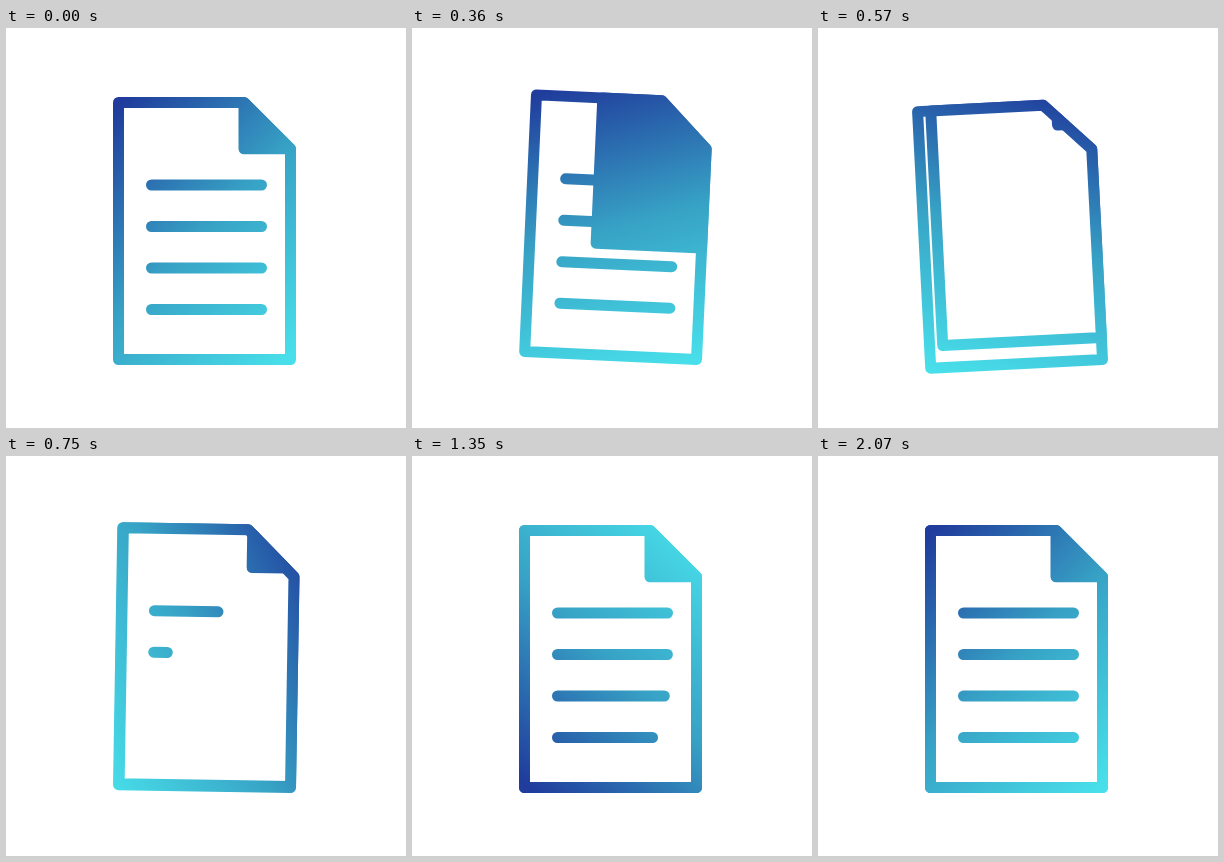
Animation of 400x400 px, one loop 4400 ms. Source, as an HTML page:

```html
<!DOCTYPE html>
<html lang="en">
<head>
<meta charset="utf-8">
<title>Document page turn</title>
<style>
  html, body { margin: 0; width: 100%; height: 100%; overflow: hidden; background: #fff; }
  svg { display: block; width: 100%; height: 100%; }
</style>
</head>
<body>
<svg viewBox="0 0 400 400">
  <defs>
    <linearGradient id="ink" gradientUnits="userSpaceOnUse">
      <stop offset="0" stop-color="#203c9c"/>
      <stop offset=".5" stop-color="#37a2c5"/>
      <stop offset="1" stop-color="#48dfea"/>
    </linearGradient>
  </defs>
  <g id="page" fill="none" stroke="url(#ink)" stroke-width="11" stroke-linecap="round" stroke-linejoin="round">
    <path id="outline"/>
    <path id="oldLines"/>
    <path id="sheet"/>
    <path id="fold" fill="url(#ink)"/>
    <path id="newLines"/>
  </g>
</svg>
<script>
const LOOP = 4400, STEP = 30;
const LEFT = 112.5, TOP = 74.5, RIGHT = 284.5, BOTTOM = 331.5;
const CUT_X = 238, CUT_Y = 120.8;
const LINE_X = 145.5, LINE_LENGTH = 110, LINE_YS = [157, 198.5, 240, 281.5];
const SHEET_START = 238, FLIP = 525, FOLD_START = 537, LINES_START = 575, LINE_DELAY = 145;
const SWING = [[0, 0], [200, 7], [548, -3], [838, 2], [1168, 0]];

const el = id => document.getElementById(id);
const clamp = u => Math.min(1, Math.max(0, u));
const mix = (a, b, u) => a + (b - a) * u;
const easeInOut = u => (1 - Math.cos(Math.PI * clamp(u))) / 2;
const easeOut = (u, power) => 1 - (1 - clamp(u)) ** power;
const polygon = points => "M" + points.map(p => p.join(" ")).join("L") + "Z";
const show = (id, visible) => el(id).setAttribute("visibility", visible ? "visible" : "hidden");

// Page body with its cut corner; (x, y) is the lower left corner.
const sheetPath = (x, y) =>
  polygon([[x, TOP], [CUT_X, TOP], [RIGHT, CUT_Y], [RIGHT, y], [x, y]]);

// Folded corner growing out of a point on the cut.
const foldPath = size => polygon(
  [[CUT_X, TOP], [CUT_X, CUT_Y], [RIGHT, CUT_Y]]
    .map(([x, y]) => [mix(254, x, size), mix(90.5, y, size)]));

const linesPath = progress => LINE_YS.map((y, i) => {
  const p = progress(i);
  return p > 0 ? `M${LINE_X} ${y}h${LINE_LENGTH * p}` : "";
}).join("");

function swingAngle(t) {
  for (let i = 1; i < SWING.length; i++) {
    const [t0, a0] = SWING[i - 1], [t1, a1] = SWING[i];
    if (t < t1) return mix(a0, a1, easeInOut((t - t0) / (t1 - t0)));
  }
  return 0;
}

function turnGradient(t) {
  const angle = Math.PI * (-0.75 + 2 * easeInOut(t / 2040));
  const dx = 150 * Math.cos(angle), dy = 150 * Math.sin(angle);
  const ends = { x1: 198.5 + dx, y1: 203 + dy, x2: 198.5 - dx, y2: 203 - dy };
  for (const name in ends) el("ink").setAttribute(name, ends[name]);
}

function render(t) {
  turnGradient(t);
  el("page").setAttribute("transform", `rotate(${swingAngle(t)} ${RIGHT} ${BOTTOM})`);

  const turn = easeOut((t - SHEET_START) / 600, 2.8);
  const flipped = t >= FLIP;
  el("sheet").setAttribute("d", sheetPath(mix(CUT_X, LEFT, turn), mix(CUT_Y, BOTTOM, turn)));
  el("sheet").setAttribute("fill", flipped ? "#fff" : "url(#ink)");

  show("oldLines", turn < 1);
  show("fold", t >= FOLD_START);
  el("fold").setAttribute("d", foldPath(easeOut((t - FOLD_START) / 620, 3)));
  el("newLines").setAttribute("d",
    linesPath(i => easeOut((t - LINES_START - i * LINE_DELAY) / 700, 3)));
}

el("outline").setAttribute("d", sheetPath(LEFT, BOTTOM));
el("oldLines").setAttribute("d", linesPath(() => 1));

const start = performance.now();
function tick() {
  const t = (performance.now() - start) % LOOP;
  render(Math.floor(t / STEP) * STEP);
  requestAnimationFrame(tick);
}
tick();
</script>
</body>
</html>
```
